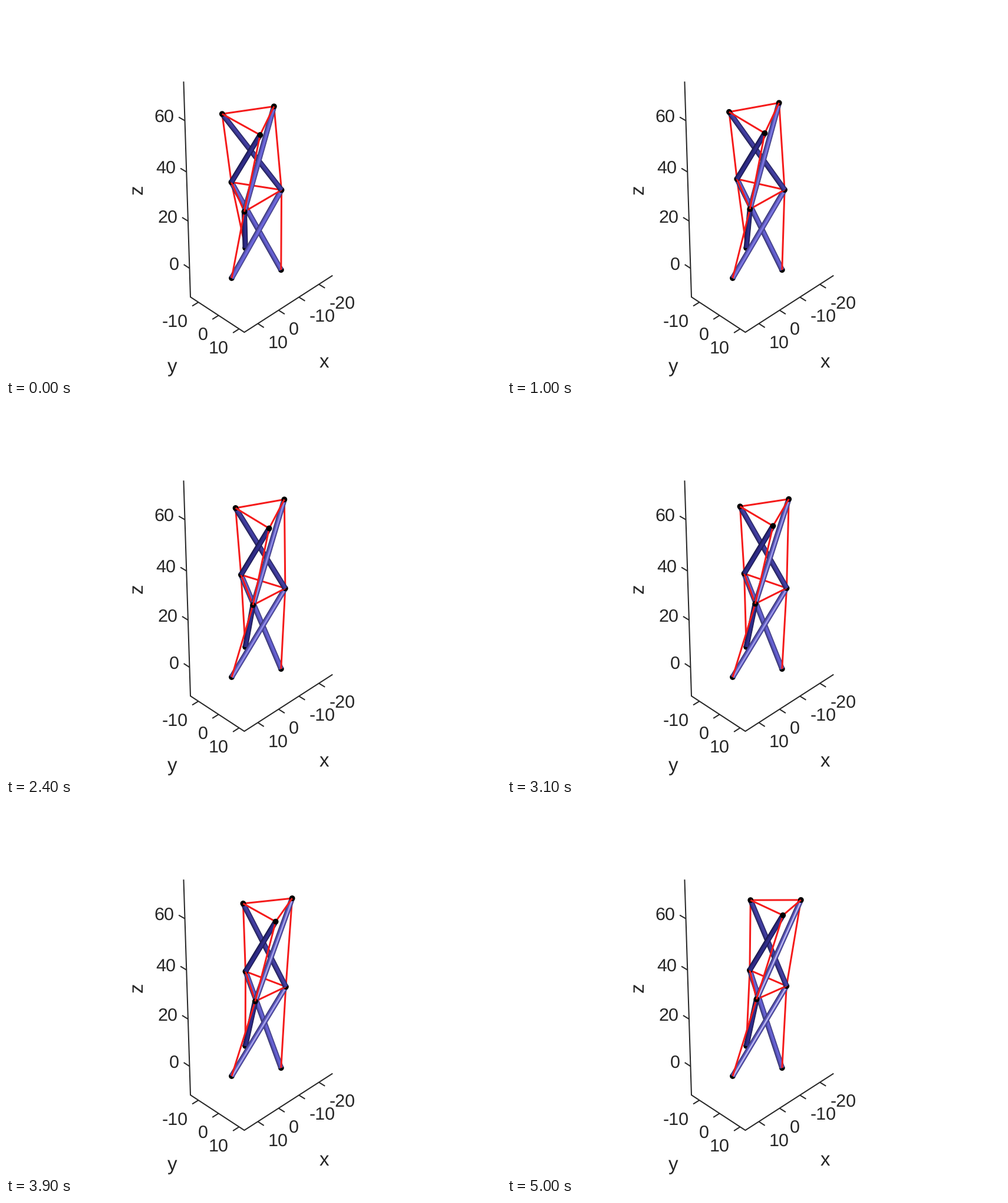
A matplotlib script that plays this animation: 840x630 px, repeating every 5100 ms.

```python
import numpy as np
import matplotlib.pyplot as plt
from matplotlib.animation import FuncAnimation
from matplotlib.patches import Circle

W, H, DPI = 840, 630, 100
FRAMES, STEP = 51, 100
PX = 72 / DPI
INK, RED = "#262626", "#f51a1a"

# Perspective camera looking along the (1, 1, 1) diagonal
TARGET = np.array([-5.3, -0.7, 31])
RIGHT = np.array([-1, 1, 0]) / np.sqrt(2)
UP = np.array([-1, -1, 2]) / np.sqrt(6)
TOWARD = np.ones(3) / np.sqrt(3)
CENTRE, ZOOM, DISTANCE = np.array([434.8, 301.6]), 5.1, 560

X_LIM, Y_LIM, Z_LIM = (-27, 16.4), (-14, 12.5), (-12.6, 74.7)
OVERHANG = 2.9

# Three triangular rings, each turned 30 degrees from the one below
RADIUS, HEIGHTS, TWIST = 10, (0, 29.7, 59.8), 30
# Lean of every joint in pixels: full shift, then the bow halfway along it
LEAN = np.array([
    [[(0, 0), (0, 0)]] * 3,
    [[(19, -17.7), (5.4, -0.9)], [(6.8, -3.3), (3, 0.6)], [(29.5, -17), (2, -2.6)]],
    [[(37, -30), (-2.8, 5.2)], [(44, -7.5), (-4, -6.4)], [(46.5, -20), (0, 1.5)]],
])

# Strut colours and how brightly the light catches each one
DARK, BRIGHT, GLINT = (np.array(c) / 255 for c in
                       [(49, 46, 142), (111, 106, 224), (192, 190, 240)])
TONES = [(1, 0.9, 0), (0.95, 0.3, 0)]
LAYERS = [(9.2, 0.5), (7.4, 0.72), (5.0, 0.87), (2.2, 1.0)]

plt.rcParams["text.hinting"] = "none"
fig = plt.figure(figsize=(W / DPI, H / DPI), dpi=DPI, facecolor="white")
ax = fig.add_axes([0, 0, 1, 1])
ax.set_xlim(0, W)
ax.set_ylim(H - 0.5, -0.5)
ax.axis("off")


def depth(point):
    return (np.array(point) - TARGET) @ TOWARD


def project(point):
    rel = np.array(point) - TARGET
    scale = ZOOM / (1 - depth(point) / DISTANCE)
    return CENTRE + scale * np.array([rel @ RIGHT, -rel @ UP])


def line(points, color, width, z):
    xs, ys = zip(*points)
    return ax.plot(xs, ys, color=color, lw=width * PX, zorder=z,
                   solid_capstyle="butt")[0]


def label(x, y, text, size=30.5, **kw):
    ax.text(x, y, text, color=INK, fontsize=size * PX, va="baseline",
            family=["Liberation Sans"], **kw)


def draw_axis(values, place, outward, shift, ha):
    for value in values:
        point = np.array(place(value))
        tick = project(point)
        line([tick, project(point + OVERHANG * np.array(outward))], INK, 2, -100)
        label(tick[0] + shift[0], tick[1] + shift[1], str(value).replace("\u2212", "-"),
              ha=ha)


def draw_axes():
    x, y, z = X_LIM[1], Y_LIM[1], Z_LIM[0]
    left = Y_LIM[0]
    corners = [(x, left, Z_LIM[1]), (x, left, z), (x, y, z), (X_LIM[0], y, z)]
    line([project(c) for c in corners], INK, 2, -100)
    draw_axis(range(-20, 11, 10), lambda v: (v, y, z), (0, 1, 0), (17.5, 42.5), "left")
    draw_axis(range(-10, 11, 10), lambda v: (x, v, z), (1, 0, 0), (-18, 42.5), "right")
    draw_axis(range(0, 61, 20), lambda v: (x, left, v), (0, -1, 0), (-18, 3), "right")
    label(540, 613, "x", 33, ha="center")
    label(282, 621.5, "y", 33, ha="center")
    label(232, 311, "z", 33, ha="center", rotation=90, rotation_mode="anchor")


def joint(ring, i):
    angle = np.radians(TWIST * ring + 120 * i)
    return RADIUS * np.cos(angle), RADIUS * np.sin(angle), HEIGHTS[ring]


REST = np.array([[joint(ring, i) for i in range(3)] for ring in range(3)])
FLAT = np.array([[project(p) for p in ring] for ring in REST])


def middle_depth(a, b):
    return (depth(REST[a]) + depth(REST[b])) / 2


def make_cable(a, b):
    return a, b, line([(0, 0)] * 2, RED, 3, middle_depth(a, b)), 0


def make_strut(a, b, tone):
    core = DARK + (BRIGHT - DARK) * tone
    return [(a, b, line([(0, 0)] * 2, core * shade, width,
                        middle_depth(a, b) + 0.01 * k), 0.3 * k)
            for k, (width, shade) in enumerate(LAYERS)]


def make_node(a):
    # Balls stand a little in front of the parts that meet inside them
    return a, ax.add_patch(Circle((0, 0), 4.9, fc="black", ec="none",
                                  zorder=depth(REST[a]) + 4))


draw_axes()
bars, glints = [], []
nodes = [make_node((ring, i)) for ring in range(3) for i in range(3)]
for low in range(2):
    high = low + 1
    for i in range(3):
        following = (i + 1) % 3
        bars.append(make_cable((high, i), (low, i)))
        bars.append(make_cable((high, i), (high, following)))
        strut = make_strut((high, following), (low, i), TONES[low][i])
        bars += strut
        if i == 0:
            glints.append(strut[-1][2])


def update(frame):
    t = frame / (FRAMES - 1)
    s = t - 0.02 * np.sin(8 * np.pi * t)
    pose = FLAT + s * LEAN[:, :, 0] + 4 * s * (1 - s) * LEAN[:, :, 1]
    for a, ball in nodes:
        ball.center = tuple(pose[a])
    for a, b, shape, shift in bars:
        p, q = pose[a], pose[b]
        dx, dy = (q - p) / np.hypot(*(q - p))
        offset = shift * np.array([dy, -dx])
        shape.set_data(*zip(p + offset, q + offset))
    # The front struts turn towards the light as the tower leans
    for glint in glints:
        glint.set_color(BRIGHT + (GLINT - BRIGHT) * s)
    return [ball for _, ball in nodes] + [bar[2] for bar in bars]


anim = FuncAnimation(fig, update, frames=FRAMES, interval=STEP,
                     repeat=True, repeat_delay=0, blit=False)
plt.show()
```
